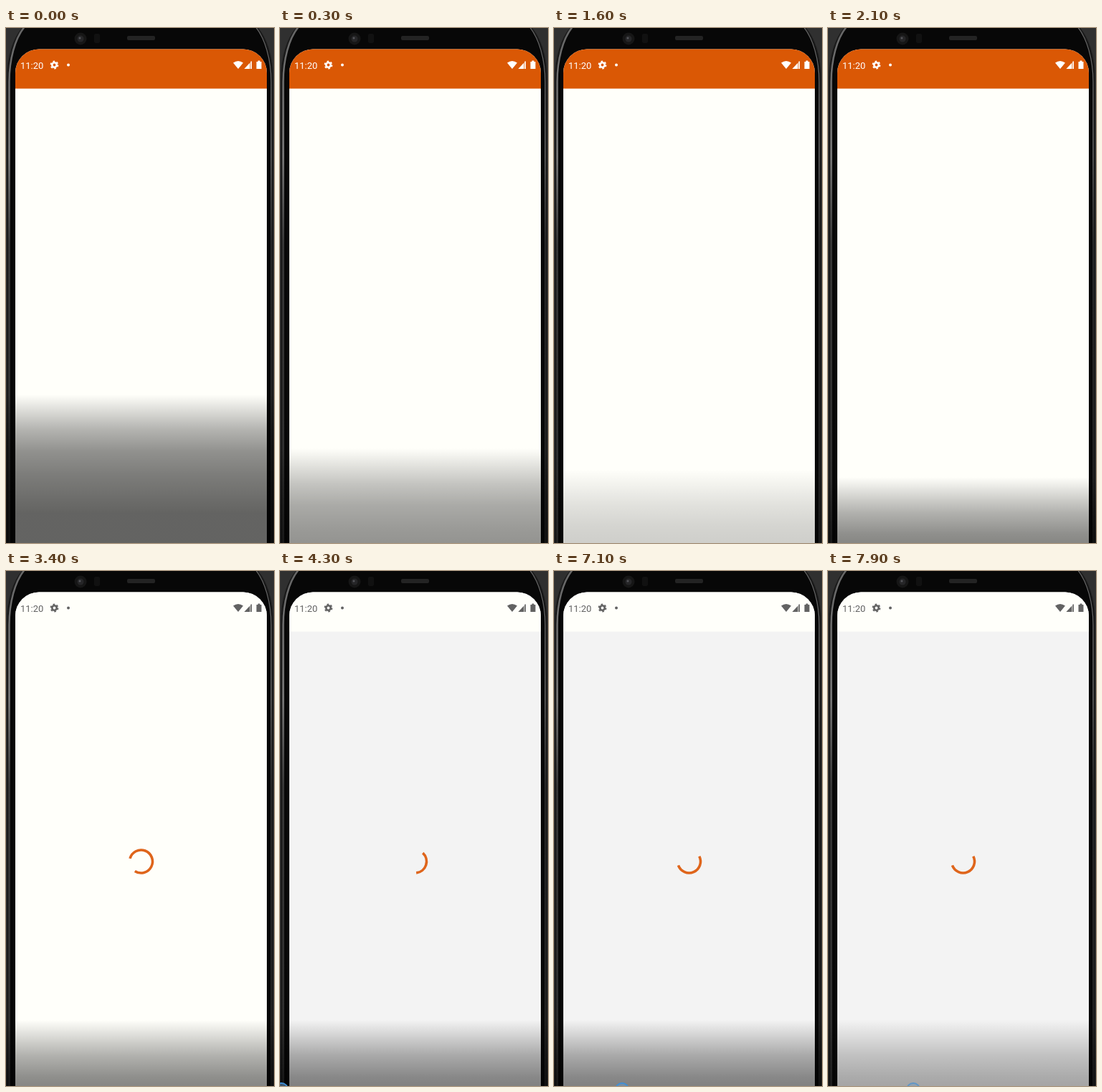
These frames come from a looping animation (374x718 px, 8000 ms). An HTML page:

```html
<!DOCTYPE html>
<html lang="en">
<head>
<meta charset="utf-8">
<style>
  html, body { margin: 0; width: 100%; height: 100%; overflow: hidden; background: #050505; }
  svg { display: block; width: 374px; height: 718px; }
  text { font: 13px Roboto, sans-serif; }
</style>
</head>
<body>
<svg viewBox="0 0 374 718">
  <defs>
    <linearGradient id="edge" x2="0" y2="718" gradientUnits="userSpaceOnUse">
      <stop stop-color="#666"/>
      <stop offset=".25" stop-color="#808080"/>
      <stop offset=".42" stop-color="#3c3c3c"/>
      <stop offset="1" stop-color="#303030"/>
    </linearGradient>
    <linearGradient id="shade" x2="0" y2="1">
      <stop stop-opacity="0"/>
      <stop offset=".13" stop-opacity=".28"/>
      <stop offset=".23" stop-opacity=".49"/>
      <stop offset=".37" stop-opacity=".71"/>
      <stop offset=".52" stop-opacity=".84"/>
      <stop offset=".77"/>
    </linearGradient>
    <clipPath id="glass"><rect x="13" y="29.5" width="351" height="760" rx="33"/></clipPath>
  </defs>

  <!-- phone body -->
  <rect width="374" height="718" fill="#303030"/>
  <path d="M2 730V72C2 40 11 12 26-3H348C363 12 372 40 372 72V730Z" fill="#070707" stroke="#1b1b1b" stroke-width="2"/>
  <path d="M4.5 730V75C4.5 45 12 14 27-3" fill="none" stroke="url(#edge)" stroke-width="2.5"/>
  <path d="M370 730V75C370 45 362 14 347-3" fill="none" stroke="url(#edge)" stroke-width="1.2"/>
  <circle cx="104" cy="15" r="8.5" fill="#161616"/>
  <circle cx="104" cy="15" r="4.5" fill="#262628"/>
  <circle cx="103" cy="14" r="1.5" fill="#55565a"/>
  <rect x="123" y="8" width="8" height="13" rx="2" fill="#111"/>
  <rect x="169" y="11" width="39" height="6" rx="2" fill="#232323"/>

  <!-- screen -->
  <g clip-path="url(#glass)">
    <rect id="page" x="13" y="29" width="351" height="689"/>
    <rect id="bar" x="13" y="29" width="351" height="55.5"/>
  </g>
  <g id="status">
    <text x="20" y="56.5">11:20</text>
    <circle cx="67.5" cy="51.5" r="3.2" fill="none" stroke="currentColor" stroke-width="2.6"/>
    <circle cx="67.5" cy="51.5" r="5" fill="none" stroke="currentColor" stroke-width="1.8" stroke-dasharray="2.618"/>
    <circle cx="87" cy="51.5" r="2"/>
    <path d="M317 48.5Q324 43.5 331 48.5L324 57Z"/>
    <path d="M332.5 57L343 46V57Z" opacity=".45"/>
    <path d="M332.5 57L340 49V57ZM341.5 46.5H343V57H341.5Z"/>
    <path d="M349.5 47H351.5V45.5H354.5V47H356.5V57H349.5Z"/>
  </g>
  <path id="spinner" fill="none" stroke="#df651b" stroke-width="3.6"/>

  <!-- player controls -->
  <rect id="scrim" width="374" height="215" fill="url(#shade)"/>
  <circle id="knob" cy="723" r="9" fill="#6f9cc6" fill-opacity=".5" stroke="#3f8fd6" stroke-width="2"/>
</svg>

<script>
const LOOP = 8000, STEP = 100, SPIN_START = 2715, SPIN_CYCLE = 1360, FREEZE = 6300;
const el = id => document.getElementById(id);
const set = (id, attrs) => {
  for (const key in attrs) el(id).setAttribute(key, attrs[key]);
};
const clamp = x => Math.min(1, Math.max(0, x));
const mix = (a, b, k) => a + (b - a) * k;
const color = (a, b, k) => `rgb(${a.map((v, i) => Math.round(mix(v, b[i], k)))})`;

const ORANGE = [218, 88, 5], IVORY = [255, 255, 250], GREY = [243, 243, 243];
const WHITE = [255, 255, 255], INK = [98, 98, 98];

// [time, value] pairs, joined by straight lines
const SCRIM_TOP = [[0, 511], [300, 586], [800, 610], [1500, 610], [1800, 626]];
const SCRIM_ALPHA = [[0, .61], [300, .47], [600, .18], [800, .045], [1500, .045], [1800, .62], [7500, .62], [7900, .42]];
const KNOB_X = [[3600, -21], [4300, 2], [5800, 56], [7900, 119]];

function track(keys, t) {
  if (t <= keys[0][0]) return keys[0][1];
  const i = keys.findIndex(k => k[0] >= t);
  if (i < 0) return keys[keys.length - 1][1];
  const [t0, a] = keys[i - 1], [t1, b] = keys[i];
  return mix(a, b, (t - t0) / (t1 - t0));
}

// cubic-bezier(.4, 0, .2, 1)
function ease(x) {
  let lo = 0, hi = 1, s = .5;
  for (let i = 0; i < 16; i++, s = (lo + hi) / 2) {
    const bx = 1.2 * s * (1 - s) ** 2 + .6 * s * s * (1 - s) + s ** 3;
    if (bx < x) lo = s; else hi = s;
  }
  return s * s * (3 - 2 * s);
}

// start angle and sweep in degrees
function spinnerPose(t) {
  if (t >= FREEZE) return [-27, 187];
  const turns = Math.max(0, t - SPIN_START) / SPIN_CYCLE;
  const count = Math.floor(turns), phase = turns - count;
  const head = ease(clamp(phase * 2)), tail = ease(clamp(phase * 2 - 1));
  return [48 + 291.6 * turns + 284.4 * (count + tail), 284.4 * (head - tail) + 3.6];
}

function arc(start, sweep) {
  const point = deg => {
    const a = deg * Math.PI / 180;
    return `${188.5 + 16 * Math.cos(a)} ${405 + 16 * Math.sin(a)}`;
  };
  return `M${point(start)}A16 16 0 ${sweep > 180 ? 1 : 0} 1 ${point(start + sweep)}`;
}

function draw(t) {
  const swap = clamp((t - 2600) / 300);
  set('bar', { fill: color(ORANGE, IVORY, swap) });
  set('page', { fill: color(IVORY, GREY, clamp((t - 3500) / 200)) });
  const ink = color(WHITE, INK, swap);
  set('status', { fill: ink, color: ink });
  set('spinner', { d: t < 2700 ? '' : arc(...spinnerPose(t)) });

  const alpha = track(SCRIM_ALPHA, t);
  set('scrim', { y: track(SCRIM_TOP, t), opacity: alpha });
  set('knob', { cx: track(KNOB_X, t), opacity: alpha / .62 });
}

function tick() {
  draw(Math.floor(performance.now() % LOOP / STEP) * STEP);
  requestAnimationFrame(tick);
}
tick();
</script>
</body>
</html>
```
